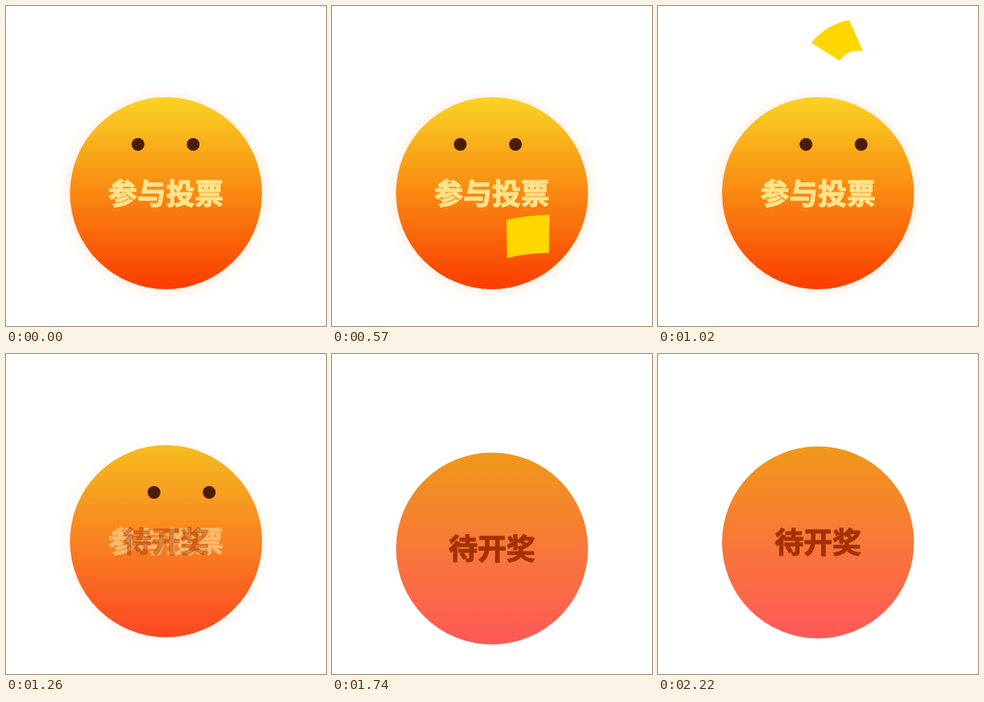
These frames come from a looping animation (400x400 px, 8 s). An HTML page with a canvas:

```html
<!DOCTYPE html>
<html lang="zh-CN">
<head>
<meta charset="utf-8">
<title>投票</title>
<style>
  html, body { margin: 0; width: 100%; height: 100%; overflow: hidden; background: #fff; }
  canvas { display: block; width: 400px; height: 400px; }
</style>
</head>
<body>
<canvas id="stage"></canvas>
<script>
const LOOP = 8000, STEP = 30, END = 2220;
const canvas = document.getElementById('stage');
const ctx = canvas.getContext('2d');
const ratio = window.devicePixelRatio || 1;
canvas.width = canvas.height = 400 * ratio;

const phase = (t, from, to) => Math.min(1, Math.max(0, (t - from) / (to - from)));
const ease = (t, from, to) => {
  const p = phase(t, from, to);
  return p * p * (3 - 2 * p);
};

// Flight of the card: evenly timed points on a smooth curve
const FLIGHT = [
  [-200, 350], [-85, 342], [36, 333], [150, 323], [245, 288],
  [325, 220], [238, 45], [185, 170], [150, 300]
];
const FLIGHT_START = -270, FLIGHT_GAP = 210;

function flight(t) {
  const u = (t - FLIGHT_START) / FLIGHT_GAP;
  const i = Math.floor(u), p = u - i;
  const [a, b, c, d] = FLIGHT.slice(i - 1, i + 3);
  return b.map((v, k) => v + p / 2 * (c[k] - a[k]
    + p * (2 * a[k] - 5 * v + 4 * c[k] - d[k])
    + p * p * (3 * (v - c[k]) + d[k] - a[k])));
}

function vector(degrees, length) {
  const r = degrees * Math.PI / 180;
  return [Math.cos(r) * length, Math.sin(r) * length];
}

// The card shrinks, turns and curls more and more along its way
function card(t) {
  const [x, y] = flight(t);
  const age = Math.max(0, t - 360), s = age / 660;
  const width = 42 + 33 * Math.exp(-age / 200);
  const height = 41 + 14.5 * Math.exp(-age / 270);
  const turn = 41 * s ** 4.6, bend = 17 * s ** 2.7;
  const slope = -2.3 - 25.7 * s ** 1.5;
  const [ux, uy] = vector(slope, width / 2);
  const [lx, ly] = vector(90 - turn - bend, height / 2);
  const [rx, ry] = vector(90 - turn + bend, height / 2);
  const [nx, ny] = vector(slope - 90, 10 * s);

  const curve = (ax, ay, bx, by) =>
    ctx.quadraticCurveTo((ax + bx) / 2 + nx, (ay + by) / 2 + ny, bx, by);
  const left = x - ux, top = y - uy, right = x + ux, bottom = y + uy;
  ctx.fillStyle = '#ffd700';
  ctx.beginPath();
  ctx.moveTo(left - lx, top - ly);
  curve(left - lx, top - ly, right - rx, bottom - ry);
  ctx.lineTo(right + rx, bottom + ry);
  curve(right + rx, bottom + ry, left + lx, top + ly);
  ctx.closePath();
  ctx.fill();
}

function gradient(from, to) {
  const g = ctx.createLinearGradient(0, 114, 0, 354);
  g.addColorStop(0, from);
  g.addColorStop(1, to);
  return g;
}
const WARM = gradient('#f9d423', '#fa3c00');
const DUSK = gradient('#f09819', '#ff5858');

function face(fill, label, color, alpha, glow) {
  if (alpha <= 0) return;
  ctx.save();
  ctx.globalAlpha = alpha;
  if (glow > 0) {
    ctx.shadowColor = `rgba(255, 140, 40, ${0.22 * glow})`;
    ctx.shadowBlur = 18 * ratio;
    ctx.shadowOffsetY = ratio;
  }
  ctx.fillStyle = fill;
  ctx.beginPath();
  ctx.arc(200, 234, 120, 0, Math.PI * 2);
  ctx.fill();
  ctx.shadowColor = 'transparent';
  ctx.fillStyle = ctx.strokeStyle = color;
  ctx.lineWidth = 1.1;
  ctx.lineJoin = 'round';
  ctx.font = '700 36px "Noto Sans CJK SC", "Noto Sans CJK", sans-serif';
  ctx.textAlign = 'center';
  ctx.fillText(label, 200, 247.5);
  ctx.strokeText(label, 200, 247.5);
  ctx.restore();
}

// The eyes follow the card, blink once and finally shut
function eyes(t) {
  const dx = 40 * ease(t, 330, 900) - 20 * ease(t, 0, 300);
  const blink = Math.sin(Math.PI * phase(t, 660, 870));
  const ry = (8 - 1.6 * blink) * (1 - ease(t, 1500, 1620));
  if (ry < 0.2) return;
  ctx.fillStyle = '#4a1d05';
  for (const x of [165, 234]) {
    ctx.beginPath();
    ctx.ellipse(x + dx, 173 + 3 * blink, 8, ry, 0, 0, Math.PI * 2);
    ctx.fill();
  }
}

// Damped swing that settles one pixel lower
function bounce(t) {
  const age = Math.max(0, t - 1525);
  return 52 * Math.exp(-age / 150) * Math.sin(Math.PI * age / 280) + ease(t, 1525, 1800);
}

function draw(t) {
  ctx.setTransform(ratio, 0, 0, ratio, 0, 0);
  ctx.fillStyle = '#fff';
  ctx.fillRect(0, 0, 400, 400);
  const flying = t >= 30 && t < 1170, behind = t >= 900;
  if (flying && behind) card(t);
  const mix = ease(t, 1170, 1380);
  ctx.save();
  ctx.translate(0, bounce(t));
  if (mix < 1) face(WARM, '参与投票', '#ffe48c', 1, 1 - mix);
  face(DUSK, '待开奖', '#a33100', mix, 0);
  eyes(t);
  ctx.restore();
  if (flying && !behind) card(t);
}

const start = performance.now();
function tick() {
  const t = (performance.now() - start) % LOOP;
  draw(Math.min(END, Math.floor(t / STEP) * STEP));
  requestAnimationFrame(tick);
}
tick();
</script>
</body>
</html>
```
